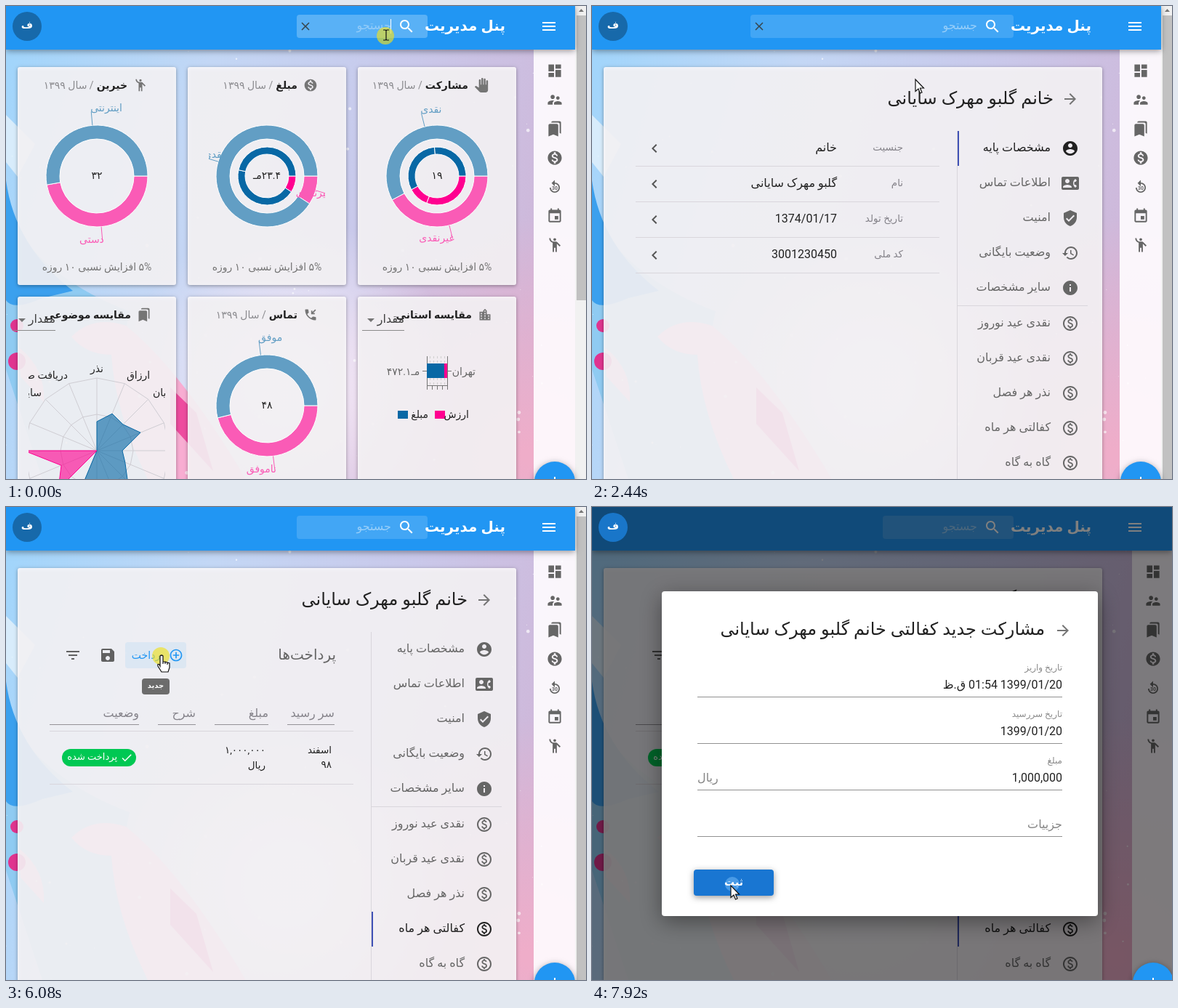
Animation, 798 px wide and 651 px high, one loop 8 s. Source, as an HTML page with a canvas:

```html
<!DOCTYPE html>
<html lang="fa">
<head>
<meta charset="utf-8">
<style>
html, body { margin: 0; width: 100%; height: 100%; overflow: hidden; }
canvas { display: block; }
</style>
</head>
<body>
<canvas id="stage" width="798" height="651"></canvas>
<script>
const ctx = document.getElementById('stage').getContext('2d');
const W = 798, H = 651, LOOP = 8000;
const FIRST = 'مهرک', NAME = `گلبو ${FIRST} سایانی`;
const INK = '#212121', GREY = '#757575', RULE = '#d9d6dc', BLUE = '#2196f3', PURPLE = '#673ab7';
const DEEP = '#0868a5', ROSE = '#ff0090', SOFT_DEEP = '#629ec4', SOFT_ROSE = '#fa5bb6';

const DISC = 'M12 2C6.48 2 2 6.48 2 12s4.48 10 10 10 10-4.48 10-10S17.52 2 12 2z';
const RING = DISC + 'm0 18c-4.41 0-8-3.59-8-8s3.59-8 8-8 8 3.59 8 8-3.59 8-8 8z';
const PHONE = 'M20 15.5c-1.25 0-2.45-.2-3.57-.57-.35-.11-.74-.03-1.02.24l-2.2 2.2c-2.83-1.44-5.15-3.75-6.59-6.58l2.2-2.21c.28-.27.36-.66.25-1.01C8.7 6.45 8.5 5.25 8.5 4c0-.55-.45-1-1-1H4c-.55 0-1 .45-1 1 0 9.39 7.61 17 17 17 .55 0 1-.45 1-1v-3.5c0-.55-.45-1-1-1z';
const ICONS = {
  menu: 'M3 18h18v-2H3v2zm0-5h18v-2H3v2zm0-7v2h18V6H3z',
  search: 'M15.5 14h-.79l-.28-.27C15.41 12.59 16 11.11 16 9.5 16 5.91 13.09 3 9.5 3S3 5.91 3 9.5 5.91 16 9.5 16c1.61 0 3.09-.59 4.23-1.57l.27.28v.79l5 4.99L20.49 19l-4.99-5zm-6 0C7.01 14 5 11.99 5 9.5S7.01 5 9.5 5 14 7.01 14 9.5 11.99 14 9.5 14z',
  close: 'M19 6.41L17.59 5 12 10.59 6.41 5 5 6.41 10.59 12 5 17.59 6.41 19 12 13.41 17.59 19 19 17.59 13.41 12z',
  dashboard: 'M3 13h8V3H3v10zm0 8h8v-6H3v6zm10 0h8V11h-8v10zm0-18v6h8V3h-8z',
  people: 'M16.5 12c1.38 0 2.49-1.12 2.49-2.5S17.88 7 16.5 7C15.12 7 14 8.12 14 9.5s1.12 2.5 2.5 2.5zM9 11c1.66 0 2.99-1.34 2.99-3S10.66 5 9 5C7.34 5 6 6.34 6 8s1.34 3 3 3zm7.5 3c-1.83 0-5.5.92-5.5 2.75V19h11v-2.25c0-1.83-3.67-2.75-5.5-2.75zM9 13c-2.33 0-7 1.17-7 3.5V19h7v-2.25c0-.85.33-2.34 2.37-3.47C10.5 13.1 9.66 13 9 13z',
  bookmarks: 'M19 18l2 1V3c0-1.1-.9-2-2-2H8.99C7.89 1 7 1.9 7 3h10c1.1 0 2 .9 2 2v13zM15 5H5c-1.1 0-2 .9-2 2v16l7-3 7 3V7c0-1.1-.9-2-2-2z',
  money: DISC + 'm1.41 16.09V20h-2.67v-1.93c-1.71-.36-3.16-1.46-3.27-3.4h1.96c.1 1.05.82 1.87 2.65 1.87 1.96 0 2.4-.98 2.4-1.59 0-.83-.44-1.61-2.67-2.14-2.48-.6-4.18-1.62-4.18-3.67 0-1.72 1.39-2.84 3.11-3.21V4h2.67v1.95c1.86.45 2.79 1.86 2.85 3.39H14.3c-.05-1.11-.64-1.87-2.22-1.87-1.5 0-2.4.68-2.4 1.64 0 .84.65 1.39 2.67 1.91s4.18 1.39 4.18 3.91c-.01 1.83-1.38 2.83-3.12 3.16z',
  moneyOutline: RING + 'M12.89 11.1c-1.78-.59-2.64-.96-2.64-1.9 0-1.02 1.11-1.39 1.81-1.39 1.31 0 1.79.99 1.9 1.34l1.58-.67c-.15-.44-.82-1.91-2.66-2.23V5h-1.75v1.26c-2.6.56-2.62 2.85-2.62 2.96 0 2.27 2.25 2.91 3.35 3.31 1.58.56 2.28 1.07 2.28 2.03 0 1.13-1.05 1.61-1.98 1.61-1.82 0-2.34-1.87-2.4-2.09l-1.66.67c.63 2.19 2.28 2.78 3.02 2.96V19h1.75v-1.24c.52-.09 3.02-.59 3.02-3.22.01-1.39-.6-2.61-3-3.44z',
  replay: 'M12 5V1L7 6l5 5V7c3.31 0 6 2.69 6 6s-2.69 6-6 6-6-2.69-6-6H4c0 4.42 3.58 8 8 8s8-3.58 8-8-3.58-8-8-8z',
  event: 'M17 12h-5v5h5v-5zM16 1v2H8V1H6v2H5c-1.11 0-1.99.9-1.99 2L3 19c0 1.1.89 2 2 2h14c1.1 0 2-.9 2-2V5c0-1.1-.9-2-2-2h-1V1h-2zm3 18H5V8h14v11z',
  waving: 'M14 4a2 2 0 1 1-4 0 2 2 0 0 1 4 0zM15.89 8.11C15.5 7.72 14.83 7 13.53 7h-2.54C8.24 6.99 6 4.75 6 2H4c0 3.16 2.11 5.84 5 6.71V22h2v-6h2v6h2V10.05L18.95 14l1.41-1.41-4.47-4.48z',
  hand: 'M23 5.5V20c0 2.2-1.8 4-4 4h-7.3c-1.08 0-2.1-.43-2.85-1.19L1 14.83s1.26-1.23 1.3-1.25c.22-.19.49-.29.79-.29.22 0 .42.06.6.16.04.01 4.31 2.46 4.31 2.46V4c0-.83.67-1.5 1.5-1.5S11 3.17 11 4v7h1V1.5c0-.83.67-1.5 1.5-1.5S15 .67 15 1.5V11h1V2.5c0-.83.67-1.5 1.5-1.5s1.5.67 1.5 1.5V11h1V5.5c0-.83.67-1.5 1.5-1.5s1.5.67 1.5 1.5z',
  city: 'M15 11V5l-3-3-3 3v2H3v14h18V11h-6zm-8 8H5v-2h2v2zm0-4H5v-2h2v2zm0-4H5V9h2v2zm6 8h-2v-2h2v2zm0-4h-2v-2h2v2zm0-4h-2V9h2v2zm0-4h-2V5h2v2zm6 12h-2v-2h2v2zm0-4h-2v-2h2v2z',
  phone: PHONE,
  call: PHONE + 'M13 11h6V9h-2.6L21 4.4 19.6 3 15 7.6V5h-2z',
  person: 'M12 4a4 4 0 1 0 0 8 4 4 0 0 0 0-8zm0 2a2 2 0 1 1 0 4 2 2 0 0 1 0-4zm0 7c-2.7 0-8 1.3-8 4v3h16v-3c0-2.7-5.3-4-8-4zm6 5H6v-1c0-.6 3.1-2 6-2s6 1.4 6 2z',
  account: DISC + 'm0 3c1.66 0 3 1.34 3 3s-1.34 3-3 3-3-1.34-3-3 1.34-3 3-3zm0 14.2c-2.5 0-4.71-1.28-6-3.22.03-1.99 4-3.08 6-3.08 1.99 0 5.97 1.09 6 3.08-1.29 1.94-3.5 3.22-6 3.22z',
  contact: 'M22 3H2C.9 3 0 3.9 0 5v14c0 1.1.9 2 2 2h20c1.1 0 1.99-.9 1.99-2L24 5c0-1.1-.9-2-2-2zM8 6c1.66 0 3 1.34 3 3s-1.34 3-3 3-3-1.34-3-3 1.34-3 3-3zm6 12H2v-1c0-2 4-3.1 6-3.1s6 1.1 6 3.1v1zm3.85-4h1.64L21 16l-1.99 1.99c-1.31-.98-2.28-2.38-2.73-3.99-.18-.64-.28-1.31-.28-2s.1-1.36.28-2c.45-1.62 1.42-3.01 2.73-3.99L21 8l-1.51 2h-1.64c-.22.63-.35 1.3-.35 2s.13 1.37.35 2z',
  shield: 'M12 1L3 5v6c0 5.55 3.84 10.74 9 12 5.16-1.26 9-6.45 9-12V5l-9-4zm-2 16l-4-4 1.41-1.41L10 14.17l6.59-6.59L18 9l-8 8z',
  history: 'M13 3c-4.97 0-9 4.03-9 9H1l3.89 3.89.07.14L9 12H6c0-3.87 3.13-7 7-7s7 3.13 7 7-3.13 7-7 7c-1.93 0-3.68-.79-4.94-2.06l-1.42 1.42C8.27 19.99 10.51 21 13 21c4.97 0 9-4.03 9-9s-4.03-9-9-9zm-1 5v5l4.28 2.54.72-1.21-3.5-2.08V8H12z',
  info: DISC + 'm1 15h-2v-6h2v6zm0-8h-2V7h2v2z',
  forward: 'M12 4l-1.41 1.41L16.17 11H4v2h12.17l-5.58 5.59L12 20l8-8z',
  chevron: 'M15.41 7.41L14 6l-6 6 6 6 1.41-1.41L10.83 12z',
  addCircle: RING + 'M13 7h-2v4H7v2h4v4h2v-4h4v-2h-4V7z',
  save: 'M17 3H5c-1.11 0-2 .9-2 2v14c0 1.1.89 2 2 2h14c1.1 0 2-.9 2-2V7l-4-4zm-5 16c-1.66 0-3-1.34-3-3s1.34-3 3-3 3 1.34 3 3-1.34 3-3 3zm3-10H5V5h10v4z',
  filter: 'M10 18h4v-2h-4v2zM3 6v2h18V6H3zm3 7h12v-2H6v2z',
  check: 'M9 16.17L4.83 12l-1.42 1.41L9 19 21 7l-1.41-1.41z',
  add: 'M19 13h-6v6h-2v-6H5v-2h6V5h2v6h6v2z',
  drop: 'M7 10l5 5 5-5z'
};
const paths = Object.fromEntries(Object.entries(ICONS).map(([k, d]) => [k, new Path2D(d)]));

const rad = deg => deg * Math.PI / 180;
const ramp = (t, a, b) => Math.min(1, Math.max(0, (t - a) / (b - a)));

function icon(name, x, y, size = 24, color = GREY, flip = 1) {
  ctx.save();
  ctx.translate(x, y);
  ctx.scale(flip * size / 24, size / 24);
  ctx.translate(-12, -12);
  ctx.fillStyle = color;
  ctx.fill(paths[name]);
  ctx.restore();
}

// y is the visual middle of the line; returns the text width
function text(str, x, y, size = 16, color = INK, { bold, align = 'right', dir = 'rtl' } = {}) {
  ctx.font = `${bold ? 'bold ' : ''}${size}px Roboto, "DejaVu Sans", sans-serif`;
  ctx.direction = dir;
  ctx.textAlign = align;
  ctx.fillStyle = color;
  ctx.fillText(str, x, y + size * .33);
  return ctx.measureText(str).width;
}

function panel(x, y, w, h, r, fill, blur = 0) {
  ctx.save();
  if (blur) {
    ctx.shadowColor = 'rgba(0,0,0,.4)';
    ctx.shadowBlur = blur;
    ctx.shadowOffsetY = blur / 4;
  }
  ctx.fillStyle = fill;
  ctx.beginPath();
  ctx.roundRect(x, y, w, h, r);
  ctx.fill();
  ctx.restore();
}

function rect(x, y, w, h, fill) {
  ctx.fillStyle = fill;
  ctx.fillRect(x, y, w, h);
}

function circle(x, y, r, fill) {
  ctx.fillStyle = fill;
  ctx.beginPath();
  ctx.arc(x, y, r, 0, 7);
  ctx.fill();
}

function line(x1, y1, x2, y2, color) {
  ctx.strokeStyle = color;
  ctx.lineWidth = 1;
  ctx.beginPath();
  ctx.moveTo(x1, y1);
  ctx.lineTo(x2, y2);
  ctx.stroke();
}

function clipped(x, y, w, h, paint) {
  ctx.save();
  ctx.beginPath();
  ctx.rect(x, y, w, h);
  ctx.clip();
  paint();
  ctx.restore();
}

function shape(d, fill) {
  ctx.fillStyle = fill;
  ctx.fill(new Path2D(d));
}

function background() {
  const sky = ctx.createLinearGradient(0, 100, 760, 330);
  ['#a2d5fb', '#c3d7f5', '#c9c8ea', '#cfb6d8'].forEach((c, i) => sky.addColorStop(i / 3, c));
  rect(0, 0, W, H, sky);
  const blush = ctx.createRadialGradient(720, 620, 10, 720, 620, 330);
  blush.addColorStop(0, '#efadc9');
  blush.addColorStop(1, 'rgba(239,173,201,0)');
  rect(0, 0, W, H, blush);
  const glow = ctx.createRadialGradient(390, 520, 40, 390, 520, 230);
  glow.addColorStop(0, 'rgba(250,240,250,.9)');
  glow.addColorStop(1, 'rgba(250,240,250,0)');
  rect(0, 0, W, H, glow);
  shape('M0 290Q60 380 170 420L150 520Q190 600 230 651H50L20 560 0 500Z', '#8fcbf2');
  shape('M0 240Q12 330 92 392L50 402Q10 420 0 405Z', '#3ba0ee');
  shape('M0 150L40 190 16 235 0 215Z', '#d8ecfb');
  shape('M90 455Q120 425 165 440Q240 500 330 651H195Q150 560 145 480Q110 480 90 455Z', '#f8add2');
  shape('M226 525L262 560 285 640 226 575Z', '#ee4c9f');
  shape('M18 470Q55 500 52 545L20 510Z', '#f3b3d3');
  circle(15, 440, 9, '#e0348f');
  circle(15, 489, 12, '#e0348f');
  let seed = 7;
  const rnd = () => (seed = seed * 16807 % 2147483647) / 2147483647;
  for (let i = 0; i < 110; i++)
    circle(rnd() * W, 60 + rnd() * 591, .5 + rnd() ** 3 * 2, 'rgba(255,255,255,.65)');
}

const card = (x, y, w, h) => panel(x, y, w, h, 3, 'rgba(255,253,255,.87)', 5);

function ring(x, y, outer, inner, cuts, colors) {
  cuts.forEach((from, i) => {
    const to = cuts[i + 1] ?? 360;
    ctx.beginPath();
    ctx.arc(x, y, outer, rad(from), rad(to));
    ctx.arc(x, y, inner, rad(to), rad(from), true);
    ctx.closePath();
    ctx.fillStyle = colors[i];
    ctx.fill();
    ctx.strokeStyle = '#fff';
    ctx.lineWidth = 1;
    ctx.stroke();
  });
}

function donut(x, y, split, labels, total) {
  ring(x, y, 70, 51, [0, split], [SOFT_ROSE, SOFT_DEEP]);
  clipped(x - 80, y - 110, 160, 220, () => labels.forEach((label, i) => {
    const mid = rad(i ? (split + 360) / 2 : split / 2), c = Math.cos(mid), s = Math.sin(mid);
    const color = i ? SOFT_DEEP : SOFT_ROSE;
    line(x + c * 70, y + s * 70, x + c * 89, y + s * 89, color);
    text(label, x + c * 90 + (i ? -1 : 2), y + s * 90 - (i ? 4 : 2), 14, color, { align: i ? 'left' : 'right' });
  }));
  text(total, x, y - 1, 14, INK, { align: 'center' });
}

function heading(name, title, x, y, year) {
  icon(name, x, y, 20);
  const w = text(title, x - 18, y, 14, INK, { bold: true });
  if (year) text('/ سال ۱۳۹۹', x - 22 - w, y, 14, '#8b8b8f');
}

function select(right) {
  text('مقدار', right, 431, 16, '#424242');
  icon('drop', right - 46, 432, 24);
  rect(right - 58, 446, 58, 1, '#8a8a8a');
}

function radar(x, y) {
  const at = (i, r) => [x + r * Math.sin(rad(i * 22.5)), y - r * Math.cos(rad(i * 22.5))];
  const trace = radii => {
    ctx.beginPath();
    radii.forEach((r, i) => ctx.lineTo(...at(i, r)));
    ctx.closePath();
  };
  clipped(31, 480, 188, 171, () => {
    for (let i = 0; i < 16; i++) line(x, y, ...at(i, 100), '#cfcdd3');
    for (const r of [50, 100]) {
      trace(Array(16).fill(r));
      ctx.stroke();
    }
    const areas = [
      [[40, 55, 51, 65, 35, 42, 60, 50, 45, 45, 0, 0, 0, 0, 0, 0], DEEP],
      [[0, 0, 0, 0, 0, 0, 0, 0, 0, 0, 75, 53, 100, 0, 0, 0], ROSE]
    ];
    for (const [radii, color] of areas) {
      trace(radii);
      ctx.globalAlpha = .62;
      ctx.fillStyle = color;
      ctx.fill();
      ctx.globalAlpha = 1;
      ctx.strokeStyle = color;
      ctx.stroke();
    }
    text('نذر', x, 499, 14, INK, { align: 'center' });
    text('ارزاق', 166, 508, 14, INK, { align: 'left' });
    text('دریافت صدقه', 85, 508, 14);
    text('یان', 202, 532, 14, INK, { align: 'left' });
    text('سایر', 49, 532, 14);
  });
}

function barChart() {
  ctx.setLineDash([3, 3]);
  for (const x of [583.5, 588.5, 593.5, 598.5, 603.5]) line(x, 482, x, 522, '#cfcfcf');
  ctx.setLineDash([]);
  for (const x of [579.5, 607.5]) line(x, 482, x, 528, GREY);
  for (const x of [586.5, 593.5, 600.5]) line(x, 522, x, 528, GREY);
  line(579, 522.5, 608, 522.5, GREY);
  line(573, 502.5, 579, 502.5, GREY);
  line(608, 502.5, 613, 502.5, GREY);
  rect(579, 492, 25, 20, DEEP);
  rect(603, 492, 4, 20, ROSE);
  text('تهران', 646, 503, 14, '#666');
  text('۴۷۲.۱مـ', 571, 503, 14, '#666', { dir: 'ltr' });
  rect(539, 557, 14, 11, DEEP);
  text('مبلغ', 581, 562, 14);
  rect(590, 557, 14, 11, ROSE);
  text('ارزش', 637, 562, 14);
}

function dashboard() {
  for (const x of [16, 250, 484]) {
    card(x, 84, 218, 300);
    card(x, 400, 218, 300);
    text('۵% افزایش نسبی ۱۰ روزه', x + 109, 359, 14, GREY, { align: 'center' });
  }
  heading('hand', 'مشارکت', 654, 109, true);
  heading('money', 'مبلغ', 419, 109, true);
  heading('waving', 'خیرین', 185, 109, true);
  heading('city', 'مقایسه استانی', 659, 425);
  heading('call', 'تماس', 419, 425, true);
  heading('bookmarks', 'مقایسه موضوعی', 190, 425);
  donut(593, 234, 152, ['غیرنقدی', 'نقدی'], '۱۹');
  ring(593, 234, 40, 30, [0, 111, 152, 265], [ROSE, ROSE, DEEP, DEEP]);
  donut(359, 234, 33, ['غیرنقدی', 'نقدی'], '۲۳.۴مـ');
  ring(359, 234, 40, 30, [0, 33, 192], [ROSE, DEEP, DEEP]);
  donut(125, 234, 170, ['دستی', 'اینترنتی'], '۳۲');
  donut(359, 550, 166, ['ناموفق', 'موفق'], '۴۸');
  select(548);
  select(68);
  barChart();
  radar(125, 612);
}

const TABS = [
  ['account', 'مشخصات پایه'], ['contact', 'اطلاعات تماس'], ['shield', 'امنیت'],
  ['history', 'وضعیت بایگانی'], ['info', 'سایر مشخصات'], ['moneyOutline', 'نقدی عید نوروز'],
  ['moneyOutline', 'نقدی عید قربان'], ['moneyOutline', 'نذر هر فصل'],
  ['moneyOutline', 'کفالتی هر ماه'], ['moneyOutline', 'گاه به گاه']
];
const DETAILS = [['جنسیت', 'خانم'], ['نام', NAME], ['تاریخ تولد', '1374/01/17'], ['کد ملی', '3001230450']];

function details() {
  DETAILS.forEach(([label, value], i) => {
    const y = 195 + 49 * i;
    text(label, 428, y, 13.5, '#85838a');
    text(value, 337, y, 16);
    icon('chevron', 86, y + 1, 24, '#555');
    rect(60, y + 25, 418, 1, RULE);
  });
}

function payments(t) {
  const w = text('پرداخت', 454, 203, 20, '#666');
  text('ها', 454 - w, 203, 20, '#666');
  if (t >= 5680) panel(164, 186, 84, 36, 4, 'rgba(33,150,243,.09)');
  icon('addCircle', 234, 204, 20, BLUE);
  text('پرداخت', 217, 204, 14, BLUE);
  icon('save', 140, 204, 24, '#616161');
  icon('filter', 92, 204, 24, '#616161');
  for (const [label, left, right] of [['سر رسید', 387, 452], ['مبلغ', 287, 361], ['شرح', 209, 261], ['وضعیت', 60, 183]]) {
    text(label, right, 284, 16, '#85838a');
    rect(left, 299, right - left, 1, '#949297');
  }
  rect(60, 308, 418, 1, RULE);
  if (t >= 4680) {
    text('اسفند', 448, 335, 13.5);
    text('۹۸', 448, 355, 13.5);
    text('۱,۰۰۰,۰۰۰', 357, 335, 13.5);
    text('ریال', 357, 356, 13.5);
    panel(77, 333, 102, 24, 12, '#00c853');
    icon('check', 166, 345, 18, '#fff');
    text('پرداخت شده', 153, 344, 13, '#fff');
    rect(60, 381, 418, 1, RULE);
  }
  if (t >= 5880 && t < 6480) {
    panel(187, 236, 38, 22, 4, 'rgba(97,97,97,.92)');
    text('جدید', 206, 246, 10, '#fff', { bold: true, align: 'center' });
  }
}

function profile(t) {
  const active = t < 3680 ? 0 : 8;
  card(16, 84, 686, 600);
  text('خانم ' + NAME, 635, 127, 24);
  icon('forward', 658, 128);
  rect(502, 172, 1, 479, RULE);
  rect(502, 412, 180, 1, RULE);
  TABS.forEach(([name, label], i) => {
    const y = 196 + 48 * i + (i > 4), color = i === active ? INK : '#666';
    icon(name, 658, y, 24, color);
    text(label, 631, y - 1, 16, color);
    if (i === active) rect(503, y - 24, 2, 48, '#3f51b5');
  });
  if (!active) details();
  else if (t >= 3880) payments(t);
}

function sidebar(x) {
  rect(x - 29, 60, W, H, 'rgba(255,253,255,.9)');
  ['dashboard', 'people', 'bookmarks', 'money', 'replay', 'event', 'waving'].forEach((name, i) =>
    icon(name, x, 89 + 40 * i, name === 'replay' ? 21 : 23, '#666'));
  text('30', x, 250.5, 7, '#666', { bold: true, align: 'center' });
}

function scrollbar(thumb) {
  rect(783, 0, 15, H, '#f1f1f1');
  rect(785, 13, 13, thumb, '#c1c1c1');
  shape('M788 8L791.5 4 795 8Z', '#777');
}

function appBar(t) {
  panel(0, 0, t < 6280 ? 783 : W, 60, 0, BLUE, 8);
  icon('menu', 747, 28, 24, '#fff');
  text('پنل مدیریت', 687, 27, 20, '#fff', { bold: true });
  const focused = t < 1240;
  const left = 400 - 182 * (ramp(t, 0, 400) - ramp(t, 3480, 3880));
  panel(left, 12, 580 - left, 32, 4, `rgba(255,255,255,${focused ? .25 : .15})`);
  icon('search', 551, 28, 24, '#fff');
  if (t < 3880) icon('close', left + 12, 28, 19, '#37474f');
  const typed = t < 2240 ? FIRST.slice(0, Math.max(0, Math.floor((t - 400) / 200))) : '';
  const w = text(typed, 530, 27, 16, '#fff');
  if (!typed) text('جستجو', 530, 27, 16, `rgba(255,255,255,${focused ? .35 : .45})`);
  if (focused) rect(529 - w, 18, 1, 20, '#fff');
}

function results(t) {
  ctx.globalAlpha = .96;
  panel(218, 48, 362, t < 1200 ? 272 : 128, 4, '#fff', 8);
  if (t >= 1440) rect(218, 56, 362, 112, '#e4e4e4');
  ctx.globalAlpha = 1;
  icon('waving', 552, 108, 24, '#616161');
  text(NAME, 524, 97, 16, PURPLE, { bold: true });
  icon('person', 516, 129, 15, '#616161');
  text('۳۰۰۱۲۳۰۴۵۰', 505, 130, 13, PURPLE);
  icon('phone', 388, 129, 15, '#616161');
  text('x۰۰۰۱۲۳۴۵۶۰۰', 377, 130, 13, PURPLE);
  icon('moneyOutline', 256, 90, 20, BLUE);
  icon('replay', 256, 133, 18, BLUE, -1);
  text('30', 256, 134.5, 6, BLUE, { bold: true, align: 'center' });
}

function dialog(t) {
  const hover = t >= 7720;
  panel(96, 116, 600, 447, 4, '#fff', 30);
  text('مشارکت جدید کفالتی خانم ' + NAME, 623, 168, 24);
  icon('forward', 648, 170);
  const fields = [['تاریخ واریز', '1399/01/20 01:54 ق.ظ'], ['تاریخ سررسید', '1399/01/20'], ['مبلغ', '1,000,000'], ['', '']];
  fields.forEach(([label, value], i) => {
    const y = 221 + 64 * i;
    text(label, 647, y, 12, '#8a8a8a');
    text(value, 647, y + 24, 16);
    rect(145, y + 40, 502, 1, '#919191');
  });
  text('ریال', 145, 373, 16, '#858585', { align: 'left' });
  text('جزییات', 647, 437, 16, '#858585');
  panel(140, 499, 110, 36, 4, hover ? '#1976d2' : BLUE, hover ? 9 : 4);
  if (t >= 7920) circle(193, 519, 10, 'rgba(120,190,250,.5)');
  text('ثبت', 195, 516, 14, '#fff', { bold: true, align: 'center' });
}

const TRACK = [
  [0, 523, 40], [1040, 523, 40], [1440, 448, 101], [2440, 445, 101], [3280, 572, 580], [4480, 572, 580],
  [4880, 455, 466], [5680, 214, 204], [6280, 214, 204], [6480, 218, 210], [7120, 218, 210], [7720, 191, 521], [8000, 191, 521]
];
const BEAM = 'M-4-7H-1L0-6 1-7H4M0-6V6M-4 7H-1L0 6 1 7H4';
const ARROW = 'M0 0V16.5L4 13 6.5 19 9 18 6.5 12H11.5Z';
const POINTING = 'M-2 1Q0-1 2 1V9L5 9 8 10 11 11V17L9 23H0L-5 15Q-6 11-3 13L-2 15ZM2 9V12M5 9V12M8 10V13';
const within = (t, ...spans) => spans.some(([a, b]) => t >= a && t < b);

function pointer(t) {
  const n = TRACK.findIndex(p => p[0] > t), [a, ax, ay] = TRACK[n - 1], [b, bx, by] = TRACK[n];
  const k = ramp(t, a, b), x = ax + (bx - ax) * k, y = ay + (by - ay) * k;
  if (within(t, [0, 200], [1840, 2040], [3680, 3880], [6080, 6280]))
    circle(x - 1, y + 1, 12, 'rgba(240,225,30,.65)');
  const overLink = within(t, [1440, 2240], [3280, 4680], [5680, 6480]);
  const outline = new Path2D(t < 1240 ? BEAM : overLink ? POINTING : ARROW);
  ctx.save();
  ctx.translate(x, y);
  ctx.lineWidth = 1.2;
  ctx.strokeStyle = '#111';
  ctx.fillStyle = '#fff';
  if (t >= 1240) ctx.fill(outline);
  ctx.stroke(outline);
  ctx.restore();
}

// Time advances in 200 ms steps with a few slightly longer ones
function stepTime(t) {
  const lag = 40 * [1240, 3280, 6520].filter(s => t >= s).length;
  return Math.floor((t - lag) / 200) * 200 + lag;
}

function draw(t) {
  const modal = t < 6280 ? 0 : t < 6480 ? .6 : 1;
  const railX = modal ? 772 : 755;
  background();
  if (t < 2240) dashboard(); else profile(t);
  sidebar(railX);
  if (!modal) scrollbar(t < 2240 ? 392 : 638);
  appBar(t);
  if (within(t, [1000, 2240])) results(t);
  if (modal) rect(0, 0, W, H, `rgba(0,0,0,${modal / 2})`);
  circle(29, 28, 20, modal ? '#1976c9' : '#1769aa');
  text('ف', 29, 26, 14, '#fff', { bold: true, align: 'center' });
  panel(railX - 28, 627, 56, 56, 28, BLUE, 8);
  icon('add', railX, 655, 24, '#fff');
  ctx.globalAlpha = modal;
  if (modal) dialog(t);
  ctx.globalAlpha = 1;
  pointer(t);
}

function frame() {
  draw(stepTime(performance.now() % LOOP));
  requestAnimationFrame(frame);
}
frame();
</script>
</body>
</html>
```
